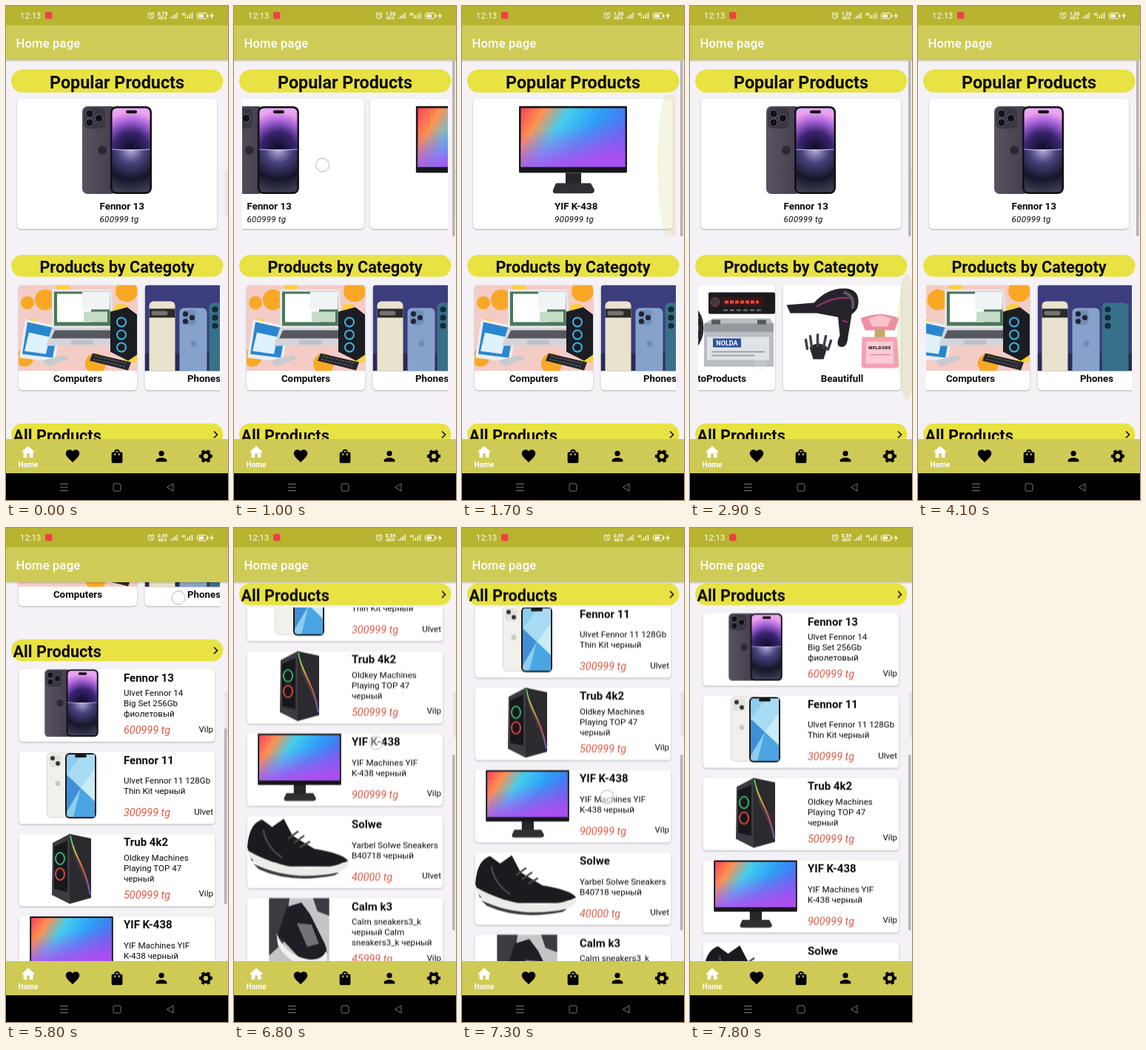
Recreate the animation shown at these times as an HTML page. Size 300 by 665 pixels, loop 8000 ms.

```html
<!DOCTYPE html>
<html lang="en">
<head>
<meta charset="utf-8">
<title>Home page</title>
<style>
html, body { margin: 0; width: 100%; height: 100%; overflow: hidden; background: #f4f2f6; }
#stage { display: block; width: 300px; height: 665px; font-family: Roboto, "Noto Sans", sans-serif; }
text { fill: #0b0b0d; white-space: pre; }
.b { font-weight: 700; }
.mid { text-anchor: middle; }
.end { text-anchor: end; }
.w { fill: #fff; }
.s12 { font-size: 11.6px; }
.s13 { font-size: 13.33px; }
.s15 { font-size: 15px; }
.s22 { font-size: 21.67px; }
.s23 { font-size: 23.33px; }
.i { font-style: italic; }
.price { font-size: 14.4px; fill: #dd5a48; }
.pill { fill: #e8e242; }
.card { fill: #fff; filter: drop-shadow(0 1px 1px rgba(0, 0, 0, .28)); }
.glow { fill: #d8cf8a; }

.anim { animation: 8s linear infinite; }
#pop { animation-name: pop; }
#cats { animation-name: cats; }
#page { animation-name: page; }
#list { animation-name: list; }
#bar { animation-name: bar; }
#touch { animation-name: touch; }
#popGlow { animation-name: popGlow; transform-origin: 289px 212px; }
#catGlow { animation-name: catGlow; transform-origin: 293px 445px; }
.rate { animation: 8s step-end infinite; }
#rate1 { animation-name: rate1; }
#rate2 { animation-name: rate2; }
#rate3 { animation-name: rate3; }

@keyframes pop {
  0%, 10% { transform: translateX(0); }
  11.5% { transform: translateX(-45px); }
  13% { transform: translateX(-140px); }
  14.5% { transform: translateX(-235px); }
  16.5%, 23.5% { transform: translateX(-278px); }
  25.5% { transform: translateX(-220px); }
  28% { transform: translateX(-85px); }
  29.5% { transform: translateX(-15px); }
  30.5%, 100% { transform: translateX(0); }
}
@keyframes cats {
  0%, 31% { transform: translateX(0); }
  33% { transform: translateX(-130px); }
  34.5% { transform: translateX(-300px); }
  35.6%, 43.75% { transform: translateX(-403px); }
  46% { transform: translateX(-310px); }
  48.5% { transform: translateX(-140px); }
  51% { transform: translateX(-30px); }
  53%, 100% { transform: translateX(0); }
}
@keyframes page {
  0%, 54.5% { transform: translateY(0); }
  56.5% { transform: translateY(-135px); }
  58.75% { transform: translateY(-335.5px); }
  61.25%, 65% { transform: translateY(-366px); }
  72.5% { transform: translateY(-412px); }
  75%, 78% { transform: translateY(-430px); }
  80.6%, 100% { transform: translateY(-487.5px); }
}
@keyframes list {
  0%, 80.6% { transform: translateY(0); }
  85% { transform: translateY(-170.5px); }
  87%, 89.4% { transform: translateY(-188px); }
  92% { transform: translateY(-95px); }
  94.5% { transform: translateY(-20px); }
  96%, 100% { transform: translateY(0); }
}
@keyframes bar {
  0%, 10% { opacity: 0; transform: translateY(0); }
  12.5%, 54.5% { opacity: 1; transform: translateY(0); }
  56.5% { transform: translateY(64px); }
  58.75% { transform: translateY(159px); }
  61.25%, 65% { transform: translateY(174px); }
  72.5% { transform: translateY(196px); }
  75%, 78% { transform: translateY(204px); }
  80.6%, 100% { opacity: 1; transform: translateY(231.5px); }
}
@keyframes popGlow {
  0%, 17.5% { opacity: 0; transform: scaleX(0); }
  21.25% { opacity: .24; transform: scaleX(1); }
  24.5%, 100% { opacity: 0; transform: scaleX(.3); }
}
@keyframes catGlow {
  0%, 35% { opacity: 0; transform: scaleX(0); }
  36.25% { opacity: .3; transform: scaleX(1); }
  40%, 100% { opacity: 0; transform: scaleX(.3); }
}
@keyframes touch {
  0%, 9.8% { opacity: 0; transform: translate(225px, 210px); }
  10% { opacity: 1; transform: translate(225px, 210px); }
  13.1% { opacity: 1; transform: translate(95px, 215px); }
  14% { opacity: 0; transform: translate(95px, 215px); }
  17.4% { opacity: 0; transform: translate(225px, 215px); }
  17.5% { opacity: 1; transform: translate(225px, 215px); }
  20.3% { opacity: 1; transform: translate(110px, 220px); }
  21% { opacity: 0; transform: translate(110px, 220px); }
  23.4% { opacity: 0; transform: translate(110px, 260px); }
  23.5% { opacity: 1; transform: translate(110px, 260px); }
  28.7% { opacity: 1; transform: translate(224px, 301px); }
  29.8% { opacity: 0; transform: translate(224px, 301px); }
  30.9% { opacity: 0; transform: translate(235px, 470px); }
  31% { opacity: 1; transform: translate(235px, 470px); }
  34.75% { opacity: 1; transform: translate(95px, 480px); }
  36.25% { opacity: .25; transform: translate(95px, 480px); }
  37.2% { opacity: 0; transform: translate(95px, 480px); }
  43.6% { opacity: 0; transform: translate(90px, 470px); }
  43.75% { opacity: 1; transform: translate(90px, 470px); }
  48.2% { opacity: 1; transform: translate(235px, 462px); }
  49% { opacity: 0; transform: translate(235px, 462px); }
  54.2% { opacity: 0; transform: translate(233px, 500px); }
  54.4% { opacity: 1; transform: translate(233px, 500px); }
  58.75% { opacity: 1; transform: translate(233px, 156px); }
  61.25%, 65% { opacity: 1; transform: translate(233px, 140px); }
  72.5% { opacity: 1; transform: translate(233px, 94px); }
  75% { opacity: 1; transform: translate(233px, 76px); }
  76% { opacity: 0; transform: translate(233px, 76px); }
  77.9% { opacity: 0; transform: translate(192px, 534px); }
  78% { opacity: 1; transform: translate(192px, 534px); }
  80.6% { opacity: 1; transform: translate(192px, 458px); }
  85% { opacity: .8; transform: translate(192px, 289px); }
  87% { opacity: .8; transform: translate(192px, 271px); }
  87.8% { opacity: 0; transform: translate(192px, 271px); }
  89.3% { opacity: 0; transform: translate(195px, 300px); }
  89.4% { opacity: 1; transform: translate(195px, 300px); }
  94.5% { opacity: 1; transform: translate(198px, 470px); }
  95.5%, 100% { opacity: 0; transform: translate(198px, 470px); }
}
@keyframes rate1 { 0% { opacity: 1; } 1.25%, 100% { opacity: 0; } }
@keyframes rate2 { 0% { opacity: 0; } 1.25% { opacity: 1; } 65%, 100% { opacity: 0; } }
@keyframes rate3 { 0% { opacity: 0; } 65%, 100% { opacity: 1; } }
</style>
</head>
<body>
<svg id="stage" viewBox="0 0 300 665">
  <defs>
    <radialGradient id="sky" gradientUnits="userSpaceOnUse" cx="66" cy="58" r="62">
      <stop offset="0" stop-color="#0d0b20"/><stop offset=".38" stop-color="#3a2470"/>
      <stop offset=".62" stop-color="#a663d8"/><stop offset=".82" stop-color="#efa0ee"/>
      <stop offset="1" stop-color="#d9b4fa"/>
    </radialGradient>
    <radialGradient id="sea" gradientUnits="userSpaceOnUse" cx="66" cy="58" r="62">
      <stop offset="0" stop-color="#b9b2dd"/><stop offset=".3" stop-color="#47437c"/>
      <stop offset=".65" stop-color="#16162a"/><stop offset="1" stop-color="#45465a"/>
    </radialGradient>
    <linearGradient id="shell"><stop offset="0" stop-color="#5a5262"/><stop offset="1" stop-color="#443d4b"/></linearGradient>
    <linearGradient id="wall" x2="1" y2=".35">
      <stop offset="0" stop-color="#ff3f5a"/><stop offset=".2" stop-color="#ff9150"/>
      <stop offset=".42" stop-color="#45cdee"/><stop offset=".7" stop-color="#2f9ff6"/>
      <stop offset="1" stop-color="#4a70f0"/>
    </linearGradient>
    <linearGradient id="dusk" x2=".25" y2="1">
      <stop offset=".4" stop-color="#b44cf0" stop-opacity="0"/><stop offset="1" stop-color="#b44cf0" stop-opacity=".9"/>
    </linearGradient>
    <linearGradient id="rgb" x2="0" y2="1">
      <stop offset="0" stop-color="#3fd06a"/><stop offset=".3" stop-color="#e8c83c"/>
      <stop offset=".6" stop-color="#f0503c"/><stop offset="1" stop-color="#5b62e8"/>
    </linearGradient>

    <symbol id="violetPhone" viewBox="0 0 94 118">
      <rect width="46" height="118" rx="7" fill="url(#shell)"/>
      <rect x="2" y="2" width="29" height="28" rx="7" fill="#3c3643"/>
      <g fill="#121116" stroke="#6b6373"><circle cx="10" cy="10" r="5.2"/><circle cx="10" cy="22" r="5.2"/><circle cx="22.5" cy="16" r="5.2"/></g>
      <circle cx="27" cy="59" r="6" fill="#2d2833"/>
      <rect x="38" width="56" height="118" rx="8" fill="#101014"/>
      <path d="M40.5 58V9q0-6.500 6.500-6.500H85q6.500 0 6.500 6.500V58z" fill="url(#sky)"/>
      <path d="M40.500 58V109q0 6.500 6.500 6.500H85q6.500 0 6.500-6.500V58z" fill="url(#sea)"/>
      <path d="M40.500 58Q66 60 91.500 58" fill="none" stroke="#e6dcfa" stroke-width=".8"/>
      <rect x="59" y="5.500" width="15" height="4" rx="2"/>
    </symbol>

    <symbol id="whitePhone" viewBox="0 0 67 90">
      <rect x=".5" y=".5" width="40" height="87" rx="6" fill="#f1f0ea" stroke="#d9d8d2"/>
      <rect x="3" y="3" width="17" height="17" rx="5" fill="#e3e2da"/>
      <circle cx="8" cy="8" r="3" fill="#34353a"/><circle cx="15" cy="15" r="3" fill="#34353a"/>
      <circle cx="15" cy="42" r="3.500" fill="#c9c8c3"/>
      <rect x="25" y="1" width="42" height="88" rx="6" fill="#15171b"/>
      <rect x="27" y="3" width="38" height="84" rx="4" fill="#8ccdf0"/>
      <path d="M27 30L46 48 27 80z" fill="#3e8fd8"/><path d="M46 48L65 22V66z" fill="#c9ecf6"/>
      <path d="M46 48L65 66V87H36z" fill="#4aa5e2"/><path d="M27 30L48 3H65V22L46 48z" fill="#a8dcf4"/>
      <rect x="38" y="3" width="16" height="4" rx="2" fill="#15171b"/>
    </symbol>

    <symbol id="tower" viewBox="0 0 55 94">
      <path d="M2 12L25 0V94L1 82z" fill="#3b3b41"/>
      <path d="M4 17L22 9V78L4 74z" fill="#17181c"/>
      <g fill="none" stroke-width="2"><ellipse cx="12" cy="33" rx="6" ry="8" stroke="#35b56a"/><ellipse cx="12" cy="54" rx="6" ry="8" stroke="#d8483c"/></g>
      <path d="M25 0L54 6V86L25 94z" fill="#2a2a2f"/>
      <path d="M26 3C31 30 45 38 52 72L52 84C44 45 28 40 26 3z" fill="#3e3e45"/>
      <path d="M26 2C30 30 46 40 53 82" fill="none" stroke="url(#rgb)" stroke-width="1.800"/>
    </symbol>

    <symbol id="monitor" viewBox="0 0 146 118">
      <rect width="146" height="90" rx="1.500" fill="#17171b"/>
      <rect x="2.500" y="3" width="141" height="79" fill="url(#wall)"/>
      <rect x="2.500" y="3" width="141" height="79" fill="url(#dusk)"/>
      <path d="M63 90H84V106H63z" fill="#25252a"/>
      <path d="M50 104H97L102 113Q102 118 96 118H50Q45 118 46 113z" fill="#2f2f34"/>
    </symbol>

    <symbol id="runner" viewBox="0 0 140 88">
      <path d="M0 42Q2 10 20 4L34 14 50 3 62 26 92 44Q130 50 138 60L132 68H30L6 60z" fill="#1b1b1f"/>
      <path d="M0 46Q28 62 58 68 104 76 139 60 140 72 122 76 76 86 34 76 6 66 0 46z" fill="#ebebe8"/>
      <path d="M8 64Q60 90 126 76L120 80Q60 92 16 72z" fill="#3a3a3e"/>
      <path d="M56 30L70 20M64 36L78 26M72 42L86 34M22 18Q26 42 48 56" fill="none" stroke="#4a4a50" stroke-width="2.500"/>
    </symbol>

    <symbol id="trainer" viewBox="0 0 82 98">
      <rect width="82" height="98" fill="#c5c5c8"/>
      <path d="M0 0H28L20 60 0 78zM60 0H82V24L66 18z" fill="#3b3b42"/>
      <path d="M24 12L44 6 56 22 76 62Q84 80 70 88L44 84 12 50z" fill="#1e1e24"/>
      <path d="M38 34L58 36 68 62 52 66z" fill="#73737b"/>
      <path d="M10 48Q22 76 48 82 70 88 78 72 84 90 66 96 30 94 12 64z" fill="#f0f0f0"/>
    </symbol>

    <clipPath id="round"><path d="M0 116V5q0-5 5-5H155q5 0 5 5V116z"/></clipPath>
  </defs>

  <rect width="300" height="665" fill="#f4f2f6"/>

  <svg y="73" width="300" height="510" viewBox="0 73 300 510">
    <g id="page" class="anim">
      <rect class="pill" x="7" y="85.500" width="286.500" height="31" rx="15.500"/>
      <text class="b s23 mid" x="150" y="110.500">Popular Products</text>

      <svg x="11" y="120" width="278" height="190" viewBox="11 120 278 190">
        <g id="pop" class="anim">
          <rect class="card" x="15" y="125" width="270" height="175" rx="5"/>
          <use href="#violetPhone" x="103" y="135" width="94" height="118"/>
          <text class="b s13" x="126.500" y="274">Fennor 13</text>
          <text class="i s12" x="126.500" y="291" letter-spacing=".25">600999 tg</text>
          <g transform="translate(278)">
            <rect class="card" x="15" y="125" width="270" height="175" rx="5"/>
            <use href="#monitor" x="77" y="134.500" width="146" height="118"/>
            <text class="b s13" x="125" y="274">YIF K-438</text>
            <text class="i s12" x="125" y="291" letter-spacing=".25">900999 tg</text>
          </g>
        </g>
        <ellipse id="popGlow" class="anim glow" cx="289" cy="212" rx="25" ry="118"/>
      </svg>

      <rect class="pill" x="7" y="335" width="286.500" height="29.500" rx="14.700"/>
      <text class="b s22 mid" x="150" y="358.500">Products by Categoty</text>

      <svg x="11" y="370" width="278" height="155" viewBox="11 370 278 155">
        <g id="cats" class="anim">
          <g transform="translate(17 375.500)">
            <rect class="card" width="160" height="141.500" rx="5"/>
            <g clip-path="url(#round)">
              <rect width="160" height="116" fill="#f4ccc6"/>
              <g fill="#f9a825"><circle cx="12" cy="24" r="9"/><circle cx="36" cy="20" r="14"/><circle cx="146" cy="8" r="15"/><circle cx="122" cy="56" r="13"/><circle cx="8" cy="98" r="12"/><circle cx="104" cy="106" r="14"/></g>
              <g fill="#fbd03c"><circle cx="60" cy="2" r="9"/><circle cx="138" cy="36" r="11"/><circle cx="18" cy="52" r="7"/><circle cx="152" cy="92" r="13"/></g>
              <path d="M9 46L57 56 49 104 1 98z" fill="#e9edf2"/><path d="M12 50L53 59 46 98 5 93z" fill="#2a86cf"/>
              <path d="M14 64L42 70 37 93 8 89z" fill="#dff1fa"/><path d="M32 102L62 94 68 99 40 110z" fill="#c9cbd0"/>
              <path d="M45 6H126L128 58H45z" fill="#e6e7ea"/><path d="M48 9H123L124 55H48z" fill="#4b7659"/>
              <path d="M52 12H98V50H52z" fill="#fff"/><path d="M86 9H123V33H86z" fill="#f0f4f6"/><path d="M88 36H120V50H88z" fill="#c4dcc8"/>
              <path d="M45 58H128L137 82H37z" fill="#d3d5da"/><path d="M49 61H124L129 72H44z" fill="#55585f"/><path d="M72 74H100L102 80H70z" fill="#bcbfc5"/>
              <path d="M124 36L147 30 160 40V94L148 102 124 90z" fill="#1c1d23"/>
              <g fill="none" stroke="#39b8e8" stroke-width="2"><circle cx="139" cy="50" r="6"/><circle cx="139" cy="67" r="6"/><circle cx="139" cy="84" r="6"/></g>
              <path d="M100 92L152 104 148 115 96 102z" fill="#26272c"/><path d="M103 96L147 106M101 100L145 110" stroke="#6d7078" stroke-dasharray="3 1.500"/>
            </g>
            <text class="b s13 mid" x="80" y="130.500">Computers</text>
          </g>

          <g transform="translate(187.500 375.500)">
            <rect class="card" width="160" height="141.500" rx="5"/>
            <g clip-path="url(#round)">
              <rect width="160" height="116" fill="#3b3d7c"/><rect y="92" width="160" height="24" fill="#2a2b55"/>
              <rect x="6" y="22" width="35" height="100" rx="6" fill="#e9e2cc"/><rect x="6" y="32" width="35" height="12" fill="#2b2a2c"/><rect x="9" y="35" width="22" height="6" rx="3" fill="#75736f"/>
              <rect x="47" y="31" width="37" height="92" rx="6" fill="#86a2cb"/><rect x="50" y="34" width="19" height="20" rx="5" fill="#718db6"/>
              <g fill="#20232e"><circle cx="55" cy="39" r="3.500"/><circle cx="55" cy="49" r="3.500"/><circle cx="64" cy="44" r="3.500"/></g>
              <circle cx="66" cy="79" r="4" fill="#6f8ab4"/>
              <rect x="87" y="24" width="36" height="100" rx="6" fill="#377089"/><g fill="#172a38"><circle cx="95" cy="33" r="4"/><circle cx="95" cy="44" r="4"/><circle cx="95" cy="55" r="4"/></g>
              <rect x="128" y="30" width="30" height="90" rx="5" fill="#28292f"/>
            </g>
            <text class="b s13 mid" x="80" y="130.500">Phones</text>
          </g>

          <g transform="translate(358 375.500)">
            <rect class="card" width="160" height="141.500" rx="5"/>
            <g clip-path="url(#round)">
              <circle cx="22" cy="58" r="38" fill="#c9cacd" stroke="#28282c" stroke-width="7"/>
              <path d="M22 22V94M-12 42L56 76M-12 76L56 42" stroke="#77797e" stroke-width="6"/><circle cx="22" cy="58" r="9" fill="#4c4d52"/>
              <rect x="70" y="10" width="90" height="29" rx="2" fill="#1b1b1f"/><rect x="88" y="17" width="56" height="12" fill="#3a1718"/>
              <circle cx="79" cy="23" r="6" fill="#3a3a40" stroke="#a33"/><path d="M92 23H138" stroke="#f04a3c" stroke-width="4" stroke-dasharray="5 2"/><path d="M90 34H144" stroke="#77777c" stroke-width="2" stroke-dasharray="6 3"/>
              <path d="M64 52L76 45H153L158 52V110H64z" fill="#b9bdc2"/><path d="M64 52H158V63H64z" fill="#93989e"/>
              <path d="M74 47H86V53H74zM136 47H148V53H136z" fill="#55585e"/><path d="M68 70H152V101H68z" fill="#e0e3e6"/>
              <rect x="76" y="72" width="38" height="12" fill="#2c529a"/><text class="b w mid" x="95" y="81.500" font-size="9">NOLDA</text>
              <path d="M74 90H146M74 95H132" stroke="#9da2aa" stroke-width="2"/>
            </g>
            <text class="b s13 mid" x="80" y="130.500" id="auto">AutoProducts</text>
          </g>

          <g transform="translate(528.500 375.500)">
            <rect class="card" width="160" height="141.500" rx="5"/>
            <g fill="#26222a">
              <path d="M5 27L42 24Q62 2 88 5 106 9 101 30 96 42 78 44L46 38 10 38z"/>
              <path d="M74 38L94 34 87 76Q84 87 75 82 72 78 77 68z"/>
            </g>
            <path d="M46 29Q70 14 94 18M80 48L88 50" fill="none" stroke="#8b2f68" stroke-width="2.500"/>
            <path d="M82 10Q98 14 94 32" fill="none" stroke="#5c5662" stroke-width="4"/>
            <path d="M36 84Q48 74 60 84L55 100H41z" fill="#2b272e"/><path d="M33 86L31 74M39 84L37 69M47 82V67M55 84L58 69M61 87L65 75" stroke="#44404a" stroke-width="3.500" stroke-linecap="round"/>
            <path d="M105 45Q131 34 157 45L151 61H111z" fill="#ee8fa2"/><path d="M115 45L131 41 147 45 141 56H121z" fill="#f9c3cb"/>
            <rect x="124" y="60" width="14" height="11" fill="#c9a765"/>
            <path d="M107 70H154L157 108Q156 112 151 112H111Q106 112 106 108z" fill="#f2a3b1"/><path d="M113 76H149L150 106H112z" fill="#f9cbd2"/>
            <text class="b mid" x="131" y="86" font-size="6" letter-spacing=".5" fill="#7c3445">MELDORE</text>
            <path d="M118 94H145" stroke="#d87a8f"/>
            <text class="b s13 mid" x="80" y="130.500">Beautifull</text>
          </g>
        </g>
      </svg>
      <ellipse id="catGlow" class="anim glow" cx="293" cy="445" rx="13" ry="85"/>

      <rect class="pill" x="7" y="562" width="286.500" height="29.500" rx="14.700"/>
      <text class="b s22" x="9.500" y="585.500">All Products</text>
      <path d="M281 572.500L285.500 577 281 581.500" fill="none" stroke="#111" stroke-width="1.700"/>
      <svg y="594" width="300" height="700" viewBox="0 594 300 700"><g id="list" class="anim"></g></svg>
    </g>
  </svg>

  <rect x="295.500" y="220" width="8" height="62" rx="3" fill="#000" opacity=".05"/>
  <rect id="bar" class="anim" x="295" y="74" width="3.500" height="236" fill="#b5b3b8"/>

  <rect y="26" width="300" height="47" fill="#cfcb58" style="filter:drop-shadow(0 1px 1px rgba(0,0,0,.2))"/>
  <rect width="300" height="26" fill="#b8b430"/>
  <text class="w" x="13.500" y="56" font-size="16.670" font-weight="500" letter-spacing=".12">Home page</text>

  <g id="status">
    <text class="w" x="19" y="17" font-size="11" letter-spacing=".2">12:13</text>
    <rect x="53" y="8" width="9.500" height="9.500" rx="2.500" fill="#ef3f47"/>
    <g fill="none" stroke="#fff"><circle cx="196" cy="13.300" r="3.700"/><path d="M196 11V13.500L198 14.500M191.500 10.500L194 8.500M200.500 10.500L198 8.500"/></g>
    <g class="b" font-size="6.700">
      <text id="rate1" class="rate w mid" x="211.500" y="12.500">0.75</text>
      <text id="rate2" class="rate w mid" x="211.500" y="12.500">1.00</text>
      <text id="rate3" class="rate w mid" x="211.500" y="12.500">0.59</text>
      <text class="w mid" x="211.500" y="18" font-size="5">KB/S</text>
      <text class="w" x="237" y="12.500" font-size="5">4G</text>
    </g>
    <path d="M223 17V15M225.700 17V13M228.400 17V11M231.100 17V9M242.500 17V14.500M245.500 17V12.500M248.500 17V10.500M251.500 17V9" stroke="#fff" stroke-width="1.300"/>
    <rect x="258.500" y="9.500" width="13" height="7.500" rx="2.200" fill="none" stroke="#fff"/><path d="M273 11.500V15" stroke="#fff" stroke-width="1.300"/>
    <rect x="260.500" y="11.300" width="6.500" height="4" fill="#fff"/>
    <path d="M279 8.500L275.500 14H278L277 18 281 12.300H278.500z" fill="#fff"/>
  </g>

  <g id="nav">
    <rect y="583" width="300" height="46" fill="#cfca55"/>
    <path class="w" transform="translate(19 589.500) scale(.92)" d="M10 20v-6h4v6h5v-8h3L12 3 2 12h3v8z"/>
    <text class="b w mid" x="30" y="621" font-size="10">Home</text>
    <path transform="translate(79 594.500) scale(.92)" d="M12 21.350l-1.450-1.320C5.400 15.360 2 12.280 2 8.500 2 5.420 4.420 3 7.500 3c1.740 0 3.410.810 4.500 2.090C13.090 3.810 14.760 3 16.500 3 19.580 3 22 5.420 22 8.500c0 3.780-3.400 6.860-8.550 11.540z"/>
    <path transform="translate(139 595) scale(.92)" d="M18 6h-2a4 4 0 0 0-8 0H6a2 2 0 0 0-2 2v12a2 2 0 0 0 2 2h12a2 2 0 0 0 2-2V8a2 2 0 0 0-2-2zm-8 4a1 1 0 0 1-2 0V8h2zm2-6a2 2 0 0 1 2 2h-4a2 2 0 0 1 2-2zm4 6a1 1 0 0 1-2 0V8h2z"/>
    <path transform="translate(199 595) scale(.92)" d="M12 12a4 4 0 1 0 0-8 4 4 0 0 0 0 8zm0 2c-2.670 0-8 1.340-8 4v2h16v-2c0-2.660-5.330-4-8-4z"/>
    <g transform="translate(270 606)" fill="none" stroke="#000">
      <circle r="5.200" stroke-width="4"/>
      <circle r="7.600" stroke-width="3" pathLength="12" stroke-dasharray="1 1" stroke-dashoffset=".5"/>
    </g>
    <rect y="629" width="300" height="36"/>
    <g fill="none" stroke="#77777a"><path d="M73 643.500H84M73 648H84M73 652.500H84"/><rect x="145" y="643" width="10" height="10" rx="2"/><path d="M226 643V653L217.500 648z" stroke-linejoin="round"/></g>
  </g>

  <g id="touch" class="anim"><circle r="9" fill="#fff" fill-opacity=".55" stroke="#9fb2c8" stroke-opacity=".7" stroke-width="1.300"/></g>
</svg>
<script>
const TOP = 602.3, PITCH = 110.8;

// art: symbol id, x, y offset, width, height
const items = [
  { art: ["violetPhone", 51, 0, 75, 91], name: "Fennor 13", price: 600999, brand: "Vilp",
    about: ["Ulvet Fennor 14", "Big Set 256Gb", "фиолетовый"] },
  { art: ["whitePhone", 55, 1, 67, 90], name: "Fennor 11", price: 300999, brand: "Ulvet",
    about: ["Ulvet Fennor 11 128Gb", "Thin Kit черный"] },
  { art: ["tower", 61, 0, 55, 94], name: "Trub 4k2", price: 500999, brand: "Vilp",
    about: ["Oldkey Machines", "Playing TOP 47", "черный"] },
  { art: ["monitor", 32, 0, 113, 91], name: "YIF K-438", price: 900999, brand: "Vilp",
    about: ["YIF Machines YIF", "K-438 черный"] },
  { art: ["runner", 18, 1, 138, 87], name: "Solwe", price: 40000, brand: "Ulvet",
    about: ["Yarbel Solwe Sneakers", "B40718 черный"] },
  { art: ["trainer", 47, 0, 82, 97], name: "Calm k3", price: 45999, brand: "Vilp",
    about: ["Calm sneakers3_k", "черный Calm", "sneakers3_k черный"] }
];

function label(cls, x, y, str) {
  return `<text class="${cls}" x="${x}" y="${y}">${str}</text>`;
}

function card({ art: [id, x, y, w, h], name, price, brand, about }, i) {
  const first = 50 - (about.length - 1) * 7;
  const lines = about.map((line, n) => label("s12", 159, first + n * 14, line)).join("");
  return `<g transform="translate(0 ${TOP + i * PITCH})">
    <rect class="card" x="17.5" width="265" height="97.500" rx="5"/>
    <use href="#${id}" x="${x}" y="${y}" width="${w}" height="${h}"/>
    ${label("b s15", 159, 16.5, name)}${lines}
    ${label("i price", 159, 87, price + " tg")}${label("s12 end", 280, 84.5, brand)}
  </g>`;
}

document.getElementById("list").innerHTML = items.map(card).join("");
</script>
</body>
</html>
```
